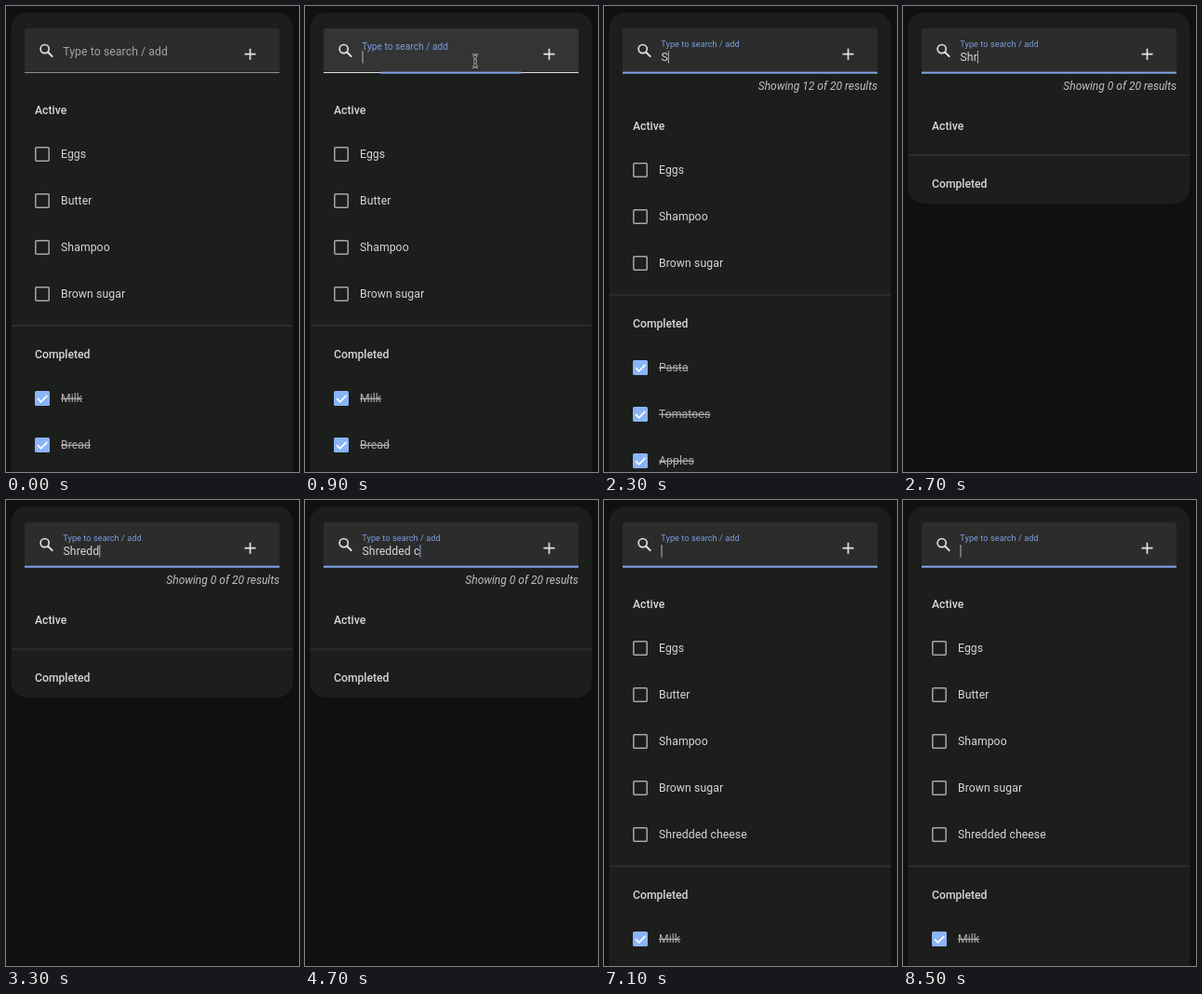
Write an HTML page that moves like this. It is 315x500 px and loops after 8900 ms.

```html
<!DOCTYPE html>
<html lang="en">
<head>
<meta charset="utf-8">
<title>Shopping list</title>
<style>
  html, body { margin: 0; width: 100%; height: 100%; overflow: hidden; background: #0f110f; }
  svg { display: block; width: 315px; height: 500px; }
  text { font: 12.2px Roboto, Arial, sans-serif; letter-spacing: .1px; fill: #d6d7d6; white-space: pre; }
  .heading { font-weight: 500; letter-spacing: 0; }
  .done { fill: #b0b1b0; text-decoration: line-through; }
  #results { font-size: 12px; font-style: italic; letter-spacing: 0; fill: #bfc0bf; text-anchor: end; }
  .icon { fill: none; stroke: #e2e2e2; stroke-width: 2; }
</style>
</head>
<body>
<svg viewBox="0 0 315 500">
  <rect width="315" height="500" fill="#0f110f"/>
  <rect id="card" x="5.5" y="7" width="303" rx="17" fill="#1c1e1c"/>
  <path id="field" d="M20 72V27q0-3 3-3H291q3 0 3 3V72Z"/>
  <rect id="baseline" x="20" y="71" width="274" height="1"/>
  <rect id="focusLine" y="70.6" height="2" fill="#83a9ee"/>
  <g class="icon" transform="translate(33.8 38.2) scale(.83)">
    <circle cx="9.5" cy="9.5" r="5.5"/>
    <path d="M13.6 13.6L19.8 19.8" stroke-width="2.4"/>
  </g>
  <path class="icon" d="M256.5 51.7h12M262.5 45.7v12" stroke-width="1.7" style="stroke-width:1.7"/>
  <text id="label">Type to search / add</text>
  <text id="query" x="61.5" y="59"></text>
  <rect id="caret" y="48" width="1" height="13.5"/>
  <text id="results" x="294" y="90"></text>
  <g id="list"></g>
  <path id="ibeam" d="M-3-6.5Q0-6.5 0-4Q0-6.5 3-6.5M0-4V4M-3 6.5Q0 6.5 0 4Q0 6.5 3 6.5M-2 1H2" fill="none"/>
  <path id="arrow" d="M0 0V13L3 10.3L5 15L7.2 14L5.2 9.5H9.3Z" fill="#000" stroke="#fff"/>
</svg>
<script>
const LOOP = 8900, STEP = 200, OFFSET = 100;
const $ = id => document.getElementById(id);
const set = (el, attrs) => { for (const k in attrs) el.setAttribute(k, attrs[k]); };
const show = (el, on) => set(el, { visibility: on ? 'visible' : 'hidden' });
const at = (steps, t) => steps.filter(s => s[0] <= t).pop()[1];
const ease = p => p * p * (3 - 2 * p);
const clamp = p => Math.max(0, Math.min(1, p));

const groceries = ['Eggs', 'Butter', 'Shampoo', 'Brown sugar'];
const views = {
  all: { active: groceries, done: ['Milk', 'Bread'], more: true },
  s: { active: ['Eggs', 'Shampoo', 'Brown sugar'], done: ['Pasta', 'Tomatoes', 'Apples'], more: true, hits: 12 },
  sh: { active: ['Shampoo'], done: [], hits: 1 },
  none: { active: [], done: [], hits: 0 },
  added: { active: [...groceries, 'Shredded cheese'], done: ['Milk'], more: true }
};

const viewSteps = [[0, 'all'], [2300, 's'], [2500, 'sh'], [2700, 'none'], [6900, 'all'], [7100, 'added']];
const typed = [[0, 0], [2300, 1], [2500, 2], [2700, 3], [2900, 4], [3300, 6], [3500, 8], [3900, 9],
  [4700, 10], [4900, 11], [5100, 13], [5300, 14], [5500, 15], [6900, 0]];
const caretSteps = [[0, 0], [900, 1], [1300, 0], [1900, 1], [4300, 0], [4700, 1],
  [5900, 0], [6500, 1], [7900, 0], [8500, 1]];
const focusSteps = [[0, [0, 0]], [900, [.71, .55]], [1100, [1, 1]]];

const text = (cls, x, y, str) => `<text class="${cls}" x="${x}" y="${y}">${str}</text>`;
const row = (str, y, done) => (done
  ? `<rect x="31" y="${y - 8}" width="16" height="16" rx="1.5" fill="#8ab4f8"/>
     <path d="M34 ${y + .2}l3.6 3.6 6.8-7" fill="none" stroke="#fff" stroke-width="1.7"/>`
  : `<rect x="31.8" y="${y - 7.2}" width="14.4" height="14.4" rx="1" fill="none" stroke="#a6a7a6" stroke-width="1.5"/>`)
  + text(done ? 'done' : '', 59, y + 4, str);

function drawList({ active, done, more, hits }) {
  const filtered = hits !== undefined;
  const top = filtered ? 129 : 112;
  const divider = top + 31 + 50 * active.length;
  const doneTop = divider + 31;
  $('list').innerHTML = text('heading', 31, top + 4.3, 'Active')
    + active.map((s, i) => row(s, top + 47 + 50 * i, false)).join('')
    + `<rect x="5.5" y="${divider - .5}" width="303" height="1" fill="#383a38"/>`
    + text('heading', 31, doneTop + 4.3, 'Completed')
    + done.map((s, i) => row(s, doneTop + 47 + 50 * i, true)).join('');
  $('results').textContent = filtered ? `Showing ${hits} of 20 results` : '';
  set($('card'), { height: more ? 520 : doneTop + 14 });
}

// The pointer comes in from the lower right, clicks, and leaves the same way.
function drawPointer(t) {
  const entering = t < 1100;
  const away = entering ? 1 - ease(clamp((t - 100) / 600)) : ease(clamp((t - 1300) / 600));
  const [dx, dy] = entering ? [103, 405] : [70, 350];
  const x = 183 + dx * away, y = 59 + dy * away;
  const visible = t >= 100 && t < 2300;
  const hover = visible && y < 72;
  show($('ibeam'), hover);
  show($('arrow'), visible && !hover);
  for (const id of ['ibeam', 'arrow']) set($(id), { transform: `translate(${x} ${y})` });
  return hover;
}

set($('ibeam'), { stroke: '#000', 'stroke-width': 1 });
const halo = $('ibeam').cloneNode();
halo.removeAttribute('id');
set(halo, { stroke: '#d8d8d8', 'stroke-width': 2.6 });
const beam = document.createElementNS('http://www.w3.org/2000/svg', 'g');
$('ibeam').replaceWith(beam);
const core = halo.cloneNode();
set(core, { stroke: '#151515', 'stroke-width': 1 });
beam.append(halo, core);
beam.id = 'ibeam';

let lastView;
function render(time) {
  const t = time < OFFSET ? 0 : OFFSET + Math.floor((time - OFFSET) / STEP) * STEP;
  const view = at(viewSteps, t);
  if (view !== lastView) drawList(views[lastView = view]);

  const hover = drawPointer(t);
  const [lift, spread] = at(focusSteps, t);
  set($('field'), { fill: hover ? '#333433' : '#2b2c2b' });
  set($('baseline'), { fill: hover ? '#dedede' : '#8c8d8c' });
  set($('focusLine'), { x: 157 - 137 * spread, width: 274 * spread });
  set($('label'), {
    transform: `translate(61.3 ${52.7 - 8.4 * lift}) scale(${1 - .25 * lift})`,
    style: `fill:${lift ? '#7c9ce0' : '#a3a4a3'}`
  });

  const query = $('query');
  query.textContent = 'Shredded cheese'.slice(0, at(typed, t));
  const width = query.textContent ? query.getComputedTextLength() : 0;
  set($('caret'), { x: 61.5 + width, fill: t >= 4300 && t < 6900 ? '#7ea6f0' : '#b4b5b4' });
  show($('caret'), at(caretSteps, t));
}

const start = performance.now();
function tick() {
  render((performance.now() - start) % LOOP);
  requestAnimationFrame(tick);
}
tick();
</script>
</body>
</html>
```
